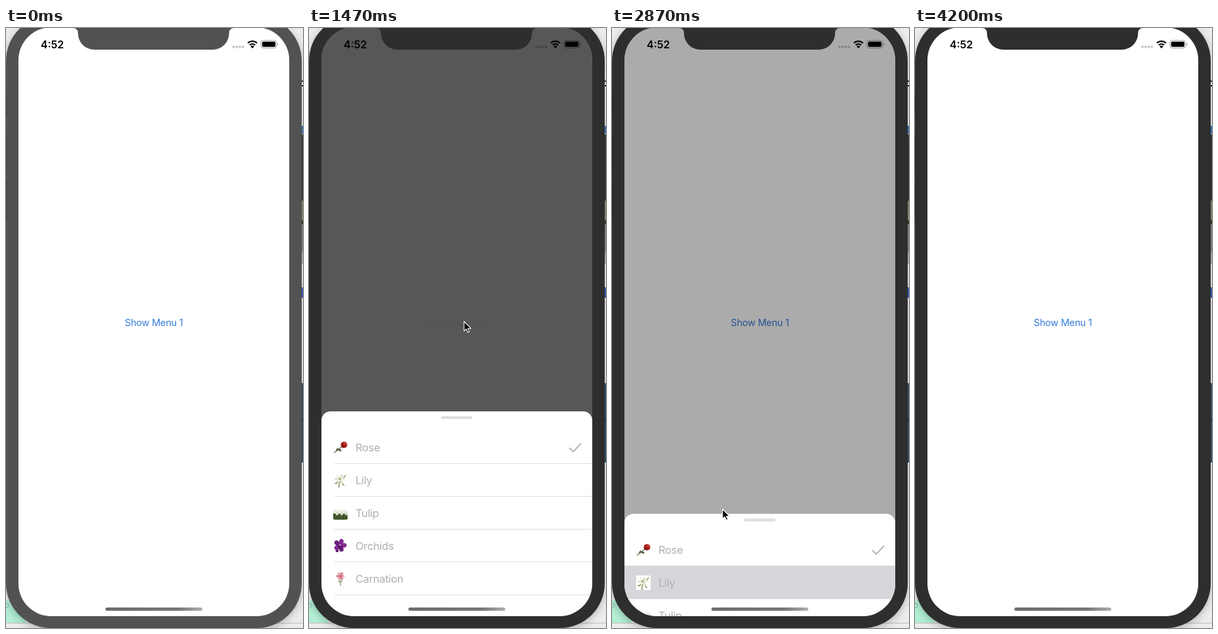
Recreate the animation shown at these times as an HTML page. Size 454 by 914 pixels, loop 4270 ms.

```html
<!DOCTYPE html>
<html lang="en">
<head>
<meta charset="utf-8">
<title>Bottom sheet menu</title>
<style>
html, body { margin: 0; width: 100%; height: 100%; overflow: hidden; background: #ececec; }
svg { display: block; }
text { font-family: Inter, "Liberation Sans", sans-serif; }
.clock { font-size: 16px; font-weight: 600; }
.button { font-size: 14.7px; letter-spacing: -.28px; fill: #367cda; text-anchor: middle; }
.row { font-size: 16.5px; letter-spacing: -.28px; fill: #b0b0b0; }
</style>
</head>
<body>
<svg width="454" height="914" viewBox="0 0 454 914">
  <defs>
    <clipPath id="screen"><rect x="19" y="-1" width="414" height="897" rx="50"/></clipPath>
    <linearGradient id="bar">
      <stop offset="0" stop-color="#6a6a6a"/><stop offset=".75" stop-color="#747474"/><stop offset="1" stop-color="#adadad"/>
    </linearGradient>
    <filter id="soft" x="-10%" y="-10%" width="120%" height="120%"><feGaussianBlur stdDeviation="7"/></filter>
  </defs>

  <rect width="454" height="914" fill="#ececec"/>
  <rect y="872" width="30" height="34" fill="#b2efd4"/>
  <rect y="906" width="454" height="1" fill="#bdbdbd"/>
  <circle cx="1" cy="880" r="3" fill="none" stroke="#86b7a3"/>
  <g id="strip"></g>
  <rect x="2" y="-14" width="448" height="930" rx="66" opacity=".3" filter="url(#soft)"/>
  <rect id="bezel" y="-18" width="452" height="932" rx="68"/>
  <path d="M.5 100V133M.5 163V222M.5 232V292" stroke="#000" stroke-opacity=".3"/>

  <g clip-path="url(#screen)">
    <rect x="19" y="-1" width="414" height="898" fill="#fff"/>
    <text class="clock" x="53" y="30.5">4:52</text>
    <g fill="#000" fill-opacity=".22">
      <circle cx="347.7" cy="28.8" r="2"/><circle cx="352.5" cy="28.8" r="2"/>
      <circle cx="357.3" cy="28.8" r="2"/><circle cx="362.1" cy="28.8" r="2"/>
    </g>
    <g fill="none" stroke="#000" stroke-width="2.3">
      <path d="M369.7 22.9a10.2 10.2 0 0 1 14 0"/>
      <path d="M372.5 26a6.2 6.2 0 0 1 8.4 0"/>
    </g>
    <path d="M376.7 31l-2.7-2.8a3.8 3.8 0 0 1 5.4 0z"/>
    <rect x="389.7" y="19" width="24" height="11.6" rx="3.4" fill="none" stroke="#000" stroke-opacity=".38"/>
    <rect x="391.5" y="20.8" width="20.4" height="8" rx="1.8"/>
    <path d="M415 22.9v3.8q1.3-.4 1.3-1.9t-1.3-1.9" fill-opacity=".42"/>
    <text id="button" class="button" x="226" y="454">Show Menu 1</text>
    <rect id="dim" x="19" y="-1" width="414" height="898"/>
    <g id="sheet">
      <rect x="19" width="414" height="400" rx="14" fill="#fff"/>
      <rect x="202" y="7.6" width="48" height="4" rx="2" fill="#dcdcdc"/>
      <g id="rows"></g>
    </g>
    <rect x="152" y="882.8" width="148" height="5" rx="2.5" fill="url(#bar)"/>
  </g>
  <path id="notch" d="M102-2v2q8 0 8 8a25 25 0 0 0 25 25H316a25 25 0 0 0 25-25q0-8 8-8v-2z"/>

  <path id="cursor" d="M0 0V14.6L3.4 11.5L5.7 16.8L8.1 15.8L5.8 10.7H10.4Z" stroke="#fff" stroke-width="1.1" stroke-linejoin="round"/>
</svg>
<script>
const LOOP = 4270, STEP = 70;
const OPEN = 584, CLOSED = 896, SLIDE = 320;
const OPEN_AT = 1012, CLOSE_AT = 2710, TAP_AT = 2520, FOCUS_AT = 350;
const $ = id => document.getElementById(id);

// Slice of the desktop beside the phone: y, height, colour
const strip = [
  [80, 2, "#222"], [87, 2, "#222"], [149, 12, "#4377c8"], [162, 101, "#3a3a3a"],
  [263, 30, "#8d8b72"], [293, 6, "#3c3c34"], [299, 43, "#8b8b8b"], [342, 17, "#b4b4b0"],
  [395, 16, "#3e62bd"], [541, 121, "#35566f"], [596, 3, "#243c50"]
];
$("strip").innerHTML = strip.map(([y, h, c]) =>
  `<rect x="451" y="${y}" width="3" height="${h}" fill="${c}"/>`).join("");

const dot = (x, y, rx, ry, fill, turn = 0) =>
  `<ellipse cx="${x}" cy="${y}" rx="${rx}" ry="${ry}" fill="${fill}" transform="rotate(${turn} ${x} ${y})"/>`;
const line = (d, color, w = 1) => `<path d="${d}" fill="none" stroke="${color}" stroke-width="${w}"/>`;
const ring = (n, cx, cy, r, draw) => Array.from({ length: n }, (_, i) => {
  const a = i / n * 2 * Math.PI;
  return draw(cx + r * Math.cos(a), cy + r * Math.sin(a), a * 180 / Math.PI, i);
}).join("");

// Flower pictures, each in a 22 px square
const flowers = {
  Rose: line("M1 19Q8 15 13 10", "#5d6b45", 1.2) + dot(6, 14, 2.6, 1.1, "#4d5e38", -50) +
    dot(10, 15, 2.8, 1.3, "#4a5137", 20) + dot(16.5, 7, 5, 4.8, "#a9201f") +
    dot(15, 9, 2.5, 2, "#7d1518") + dot(18, 5.5, 2.2, 1.7, "#c83a34"),
  Lily: '<rect width="22" height="22" fill="#fff"/>' +
    line("M11 12Q8 17 9 22M11 12Q14 17 17 19M11 12Q16 8 19 3", "#71864a", 1.3) +
    ring(6, 10, 9, 4.3, (x, y, a, i) => dot(x, y, 4, 1.7, i % 2 ? "#dfe2cd" : "#eceee2", a)) +
    dot(10, 9, 1.7, 1.4, "#9da465") + dot(5, 15, 3, 1, "#819160", -30),
  Tulip: '<rect y="10" width="22" height="11" rx="2" fill="#4b6130"/>' +
    line("M2 20V12M6 21V13M10 21V12M15 21V13M19 20V12", "#2f4420", 1.4) +
    [2.2, 5.8, 9.5, 13, 16.6, 20].map((x, i) =>
      dot(x, 8.5 + i % 2 * 2.5, 2.1, 3.6, i % 2 ? "#dcdfcd" : "#eceee4")).join(""),
  Orchids: ring(5, 10.5, 10, 5.5, (x, y, a, i) => dot(x, y, 4.6, 3.5, i % 2 ? "#6d2180" : "#832a91", a)) +
    dot(10.5, 12, 2.8, 3.4, "#561365") + dot(10.5, 9.5, 1.4, 1.2, "#d3a4d6") + dot(6, 18.5, 2.4, 2, "#5c1a6e"),
  Carnation: line("M11 10Q10 16 11.5 22M11 17L8 14M11 17L14 14", "#839a72", 1.2) +
    ring(6, 11, 7, 3.8, (x, y, a, i) => dot(x, y, 2.8, 2.1, i % 2 ? "#dc8b9a" : "#edb1b9", a)) +
    dot(11, 7, 3, 2.3, "#d46d82")
};
const names = Object.keys(flowers);
$("rows").innerHTML =
  names.map((_, i) => `<rect x="39" y="${79 + 50 * i}" width="394" height="1" fill="#dfdfe1"/>`).join("") +
  '<rect id="tapped" x="19" y="79" width="414" height="51" fill="#d7d7db"/>' +
  names.map((name, i) =>
    `<g transform="translate(37 ${44 + 50 * i})">${flowers[name]}</g>` +
    `<text class="row" x="71" y="${61 + 50 * i}">${name}</text>`).join("") +
  line("M398 55.5L404 61.5L416 48.5", "#bababa", 2.2);

// Tables of time followed by values
const fade = [[0, 1], [840, 1], [910, .25], [1050, .25], [1190, .1], [2730, .1], [2870, 1]];
const path = [
  [0, 470, 640], [70, 440, 610], [420, 300, 500], [490, 300, 500], [840, 237, 447],
  [1610, 237, 447], [2170, 171, 690], [2520, 171, 692], [2660, 170, 714], [2730, 170, 722],
  [2870, 169, 733], [3080, 172, 760], [3290, 178, 795], [3500, 178, 795], [3780, 229, 449],
  [3920, 229, 449], [4130, 440, 305], [4200, 470, 296]
];

function at(table, t) {
  const next = table.findIndex(row => row[0] > t);
  if (next < 0) return table[table.length - 1].slice(1);
  const a = table[next - 1], b = table[next], k = (t - a[0]) / (b[0] - a[0]);
  return a.slice(1).map((v, i) => v + (b[i + 1] - v) * k);
}

function ease(t, start) {
  const x = Math.min(1, Math.max(0, (t - start) / SLIDE));
  return x * x * (3 - 2 * x);
}

function draw(t) {
  const shown = ease(t, OPEN_AT) - ease(t, CLOSE_AT);
  const bezel = t < FOCUS_AT ? "#525252" : "#2e2e2e";
  $("bezel").setAttribute("fill", bezel);
  $("notch").setAttribute("fill", bezel);
  $("button").setAttribute("opacity", at(fade, t)[0]);
  $("dim").setAttribute("opacity", .66 * shown);
  $("sheet").setAttribute("transform", `translate(0 ${CLOSED + (OPEN - CLOSED) * shown})`);
  $("sheet").setAttribute("visibility", shown > 0 ? "visible" : "hidden");
  $("tapped").setAttribute("opacity", t >= TAP_AT ? 1 : 0);
  $("cursor").setAttribute("transform", `translate(${at(path, t).join(" ")})`);
}

const begin = performance.now();
function tick() {
  const t = (performance.now() - begin) % LOOP;
  draw(Math.floor(t / STEP) * STEP);
  requestAnimationFrame(tick);
}
tick();
</script>
</body>
</html>
```
